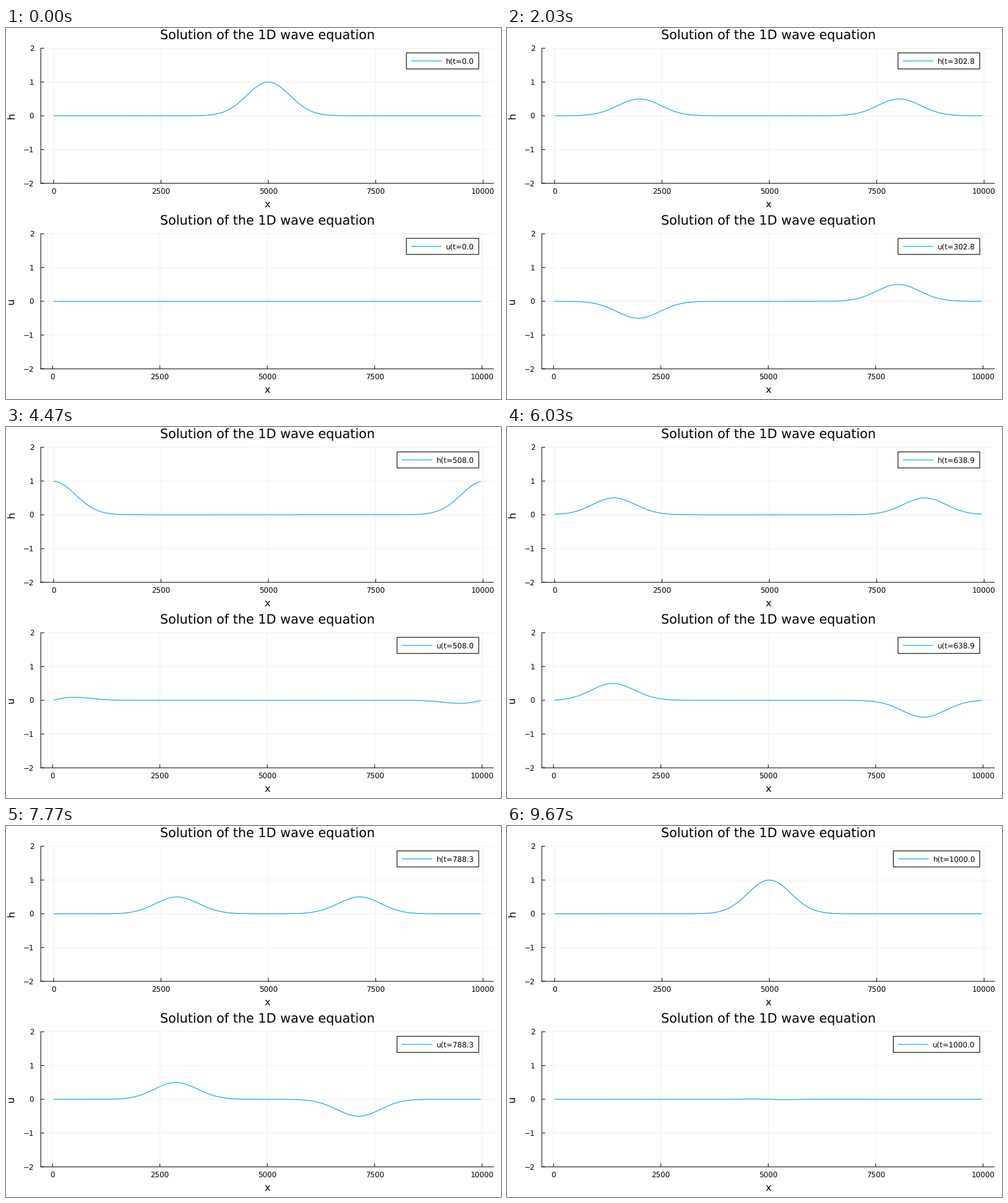
A matplotlib script for the animation above (9.71 s loop, 800 by 600 pixels).

```python
import numpy as np
import matplotlib.pyplot as plt
from matplotlib.animation import FuncAnimation
from matplotlib.patches import Rectangle

plt.rcParams["font.family"] = "DejaVu Sans"
plt.rcParams["text.hinting"] = "none"

W, H, DPI = 800, 600, 100
TICKS, LOOP_MS = 582, 9710  # two drawing ticks per solver step
LAST_STEP = 290
PX = 72 / DPI  # points per pixel
BLUE, GRID = "#009AFA", "#F0F0F0"
SMALL, MEDIUM, LARGE = 11.87, 16.3, 20.75  # font sizes in pixels

# Wave on a periodic staggered grid
N, DX, SPEED = 200, 50.0, 10.0
X_H = np.arange(N) * DX
X_U = X_H + DX / 2
K = 2 * np.pi * np.fft.rfftfreq(N, DX)
OMEGA = 2 * SPEED / DX * np.sin(K * DX / 2)
START = np.fft.rfft(np.exp(-((X_H - 5000) / 500) ** 2 / 2))

# The solver's adaptive steps: large at first, then settling
STEPS = [0, 1, 2, 3, 4, 7, 12, 16, 22, 30, 61, 134, 181, 209, 240, 257, 270, 290]
TIMES = [0, 0.1, 1, 7, 18, 62, 133, 163, 187, 212, 302.8, 508, 638.9, 717.2,
         809, 868.8, 924, 1000]

LEFT, RIGHT, TOP, BOTTOM = 56.2, 788.3, 32.8, 251.2


def height(t):
    return np.fft.irfft(START * np.cos(OMEGA * t), N)


def velocity(t):
    shift = np.exp(1j * K * DX / 2)
    return np.fft.irfft(-1j * START * np.sin(OMEGA * t) * shift, N)


fig = plt.figure(figsize=(W / DPI, H / DPI), dpi=DPI, facecolor="white")
ax = fig.add_axes([0, 0, 1, 1])
ax.set_xlim(0, W)
ax.set_ylim(H, 0)
ax.axis("off")


def curve(xs, ys, z):
    line, = ax.plot(xs, ys, color=BLUE, lw=1.1 * PX, zorder=z,
                    solid_capstyle="butt", snap=False)
    return line


def vlines(xs, y0, y1, color="black", z=2):
    ax.vlines(xs, y0, y1, colors=color, lw=PX, zorder=z, snap=False)


def hlines(ys, x0, x1, color="black", z=2):
    ax.hlines(ys, x0, x1, colors=color, lw=PX, zorder=z, snap=False)


def label(x, y, text, size, ha="center", **kw):
    return ax.text(x, y, text, fontsize=size * PX, ha=ha, va="baseline",
                   zorder=7, **kw)


class Panel:
    def __init__(self, name, offset, xs, field):
        self.name, self.field = name, field
        self.top, self.bottom = TOP + offset, BOTTOM + offset
        pad = 0.03 * (xs[-1] - xs[0])
        self.x0, self.x1 = xs[0] - pad, xs[-1] + pad
        self.draw_axes()
        self.curve = curve(self.px(xs), self.py(0 * xs), 4)
        self.draw_legend(offset)

    def px(self, x):
        return LEFT + (x - self.x0) / (self.x1 - self.x0) * (RIGHT - LEFT)

    def py(self, y):
        return self.top + (2 - y) / 4 * (self.bottom - self.top)

    def draw_axes(self):
        top, bottom = self.top, self.bottom
        x_ticks, y_ticks = np.arange(0, 10001, 2500), np.arange(-2, 3)
        xs, ys = self.px(x_ticks), self.py(y_ticks)
        vlines(xs, top, bottom, GRID, 1)
        hlines(ys, LEFT, RIGHT, GRID, 1)
        vlines(xs, bottom - 5.5, bottom)
        hlines(ys, LEFT, LEFT + 5.5)
        vlines([LEFT], top - 0.5, bottom + 0.5)
        hlines([bottom], LEFT - 0.5, RIGHT)
        for x, v in zip(xs, x_ticks):
            label(x, bottom + 17.6, str(v), SMALL)
        for y, v in zip(ys, y_ticks):
            label(45.2, y + 4.4, str(v).replace("-", "\u2212"), SMALL, "right")
        mid = (LEFT + RIGHT) / 2
        label(mid, top - 14.5, "Solution of the 1D wave equation", LARGE)
        label(mid, bottom + 38.8, "x", MEDIUM)
        label(13.3, self.py(0), self.name, MEDIUM, rotation=90,
              rotation_mode="anchor")

    def draw_legend(self, offset):
        self.box = Rectangle((0, 40.2 + offset), 1, 26, fc="white", ec="black",
                             lw=1.1 * PX, zorder=5, snap=False)
        ax.add_patch(self.box)
        y = 53.2 + offset
        self.key = curve([0, 1], [y, y], 6)
        self.caption = label(0, y + 4.1, "", SMALL, "left")

    def update(self, t):
        self.curve.set_ydata(self.py(self.field(t)))
        value = f"{t:.1f}"
        # Legend width follows the text's advance widths
        x = 756.7 - SMALL * (2.572 + 0.636 * (len(value) - 1))
        left = x - 64
        self.caption.set_text(f"{self.name}(t={value}")
        self.caption.set_x(x)
        self.key.set_xdata([x - 56, x - 7])
        self.box.set_x(left)
        self.box.set_width(764 - left)


panels = [Panel("h", 0, X_H, height), Panel("u", 300, X_U, velocity)]


def step_at(tick):
    # 30 steps a second, each start rounded to a hundredth
    hundredths = ((tick + 1) * LOOP_MS // 10 - 1) // TICKS
    return min(int(0.3 * (hundredths + 0.5)), LAST_STEP)


def update(tick):
    t = np.interp(step_at(tick), STEPS, TIMES)
    for panel in panels:
        panel.update(t)
    return []


anim = FuncAnimation(fig, update, frames=TICKS, interval=LOOP_MS / TICKS,
                     repeat=True, repeat_delay=0, blit=False)
plt.show()
```
